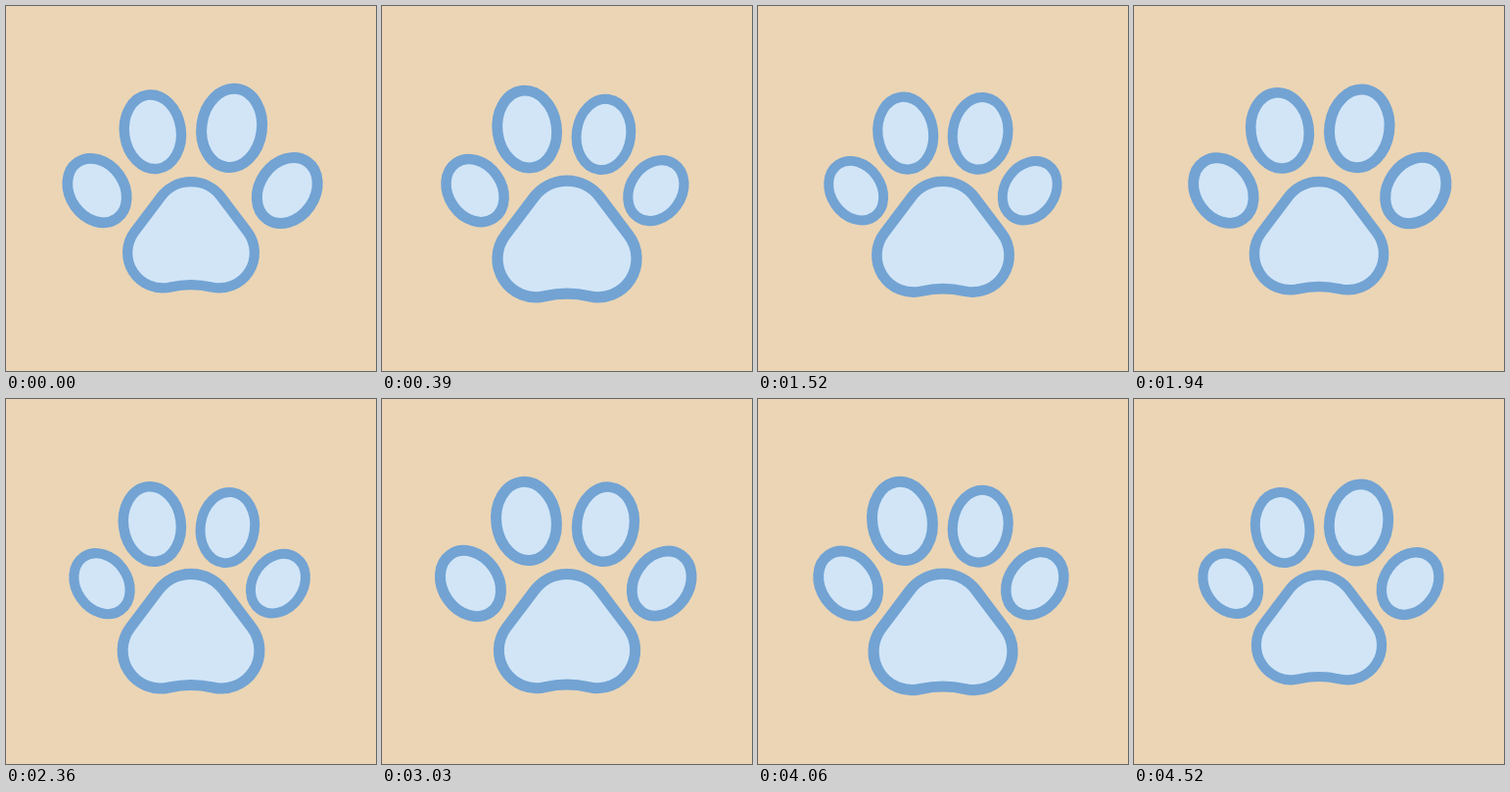
Recreate the animation shown at these times as an HTML page. Size 378 by 372 pixels, loop 4.56 s.

```html
<!DOCTYPE html>
<html lang="en">
<head>
<meta charset="utf-8">
<title>Pulsing paw</title>
<style>
  html, body { margin: 0; height: 100%; overflow: hidden; background: #ebd5b5; }
  svg { display: block; width: 100vw; height: 100vh; }
  .part { fill: #d1e5f7; stroke: #72a3d3; stroke-width: 11; }
</style>
</head>
<body>
<svg viewBox="0 0 378 372">
  <g id="paw" transform="translate(189 190)">
    <!-- listed in the order in which the pulse reaches them -->
    <ellipse class="part" rx="30.7" ry="40.2" data-place="translate(41.5 -65.5) rotate(8)"/>
    <ellipse class="part" rx="28.4" ry="35.8" data-place="translate(98.5 -2) rotate(35)"/>
    <ellipse class="part" rx="28.4" ry="35.8" data-place="translate(-98.5 -2) rotate(-35)"/>
    <ellipse class="part" rx="30.7" ry="40.2" data-place="translate(-41.5 -65.5) rotate(-8)"/>
    <path class="part" data-size="0.97" d="M-33.1 4.9A41.5 41.5 0 0 1 33.1 4.9L61.7 42.7A38.5 38.5 0 0 1 22.3 103.5Q0 98.4-22.3 103.5A38.5 38.5 0 0 1-61.7 42.7Z"/>
  </g>
</svg>
<script>
  const LOOP = 4560, PERIOD = 940, LAG = 94, FIRST_PEAK = -23.5;
  const SIZE = 0.951, SWING = 0.055;
  const parts = [...document.querySelectorAll('.part')];

  function draw(time) {
    parts.forEach((part, i) => {
      const angle = 2 * Math.PI * (time - FIRST_PEAK - i * LAG) / PERIOD;
      const scale = (part.dataset.size || SIZE) * (1 + SWING * Math.cos(angle));
      part.setAttribute('transform', `scale(${scale}) ${part.dataset.place || ''}`);
    });
  }

  const start = performance.now();
  function tick() {
    const t = (performance.now() - start) % LOOP;
    // short rests at both ends of the loop
    draw(t < 60 ? 0 : Math.min(t, 4520));
    requestAnimationFrame(tick);
  }
  tick();
</script>
</body>
</html>
```
